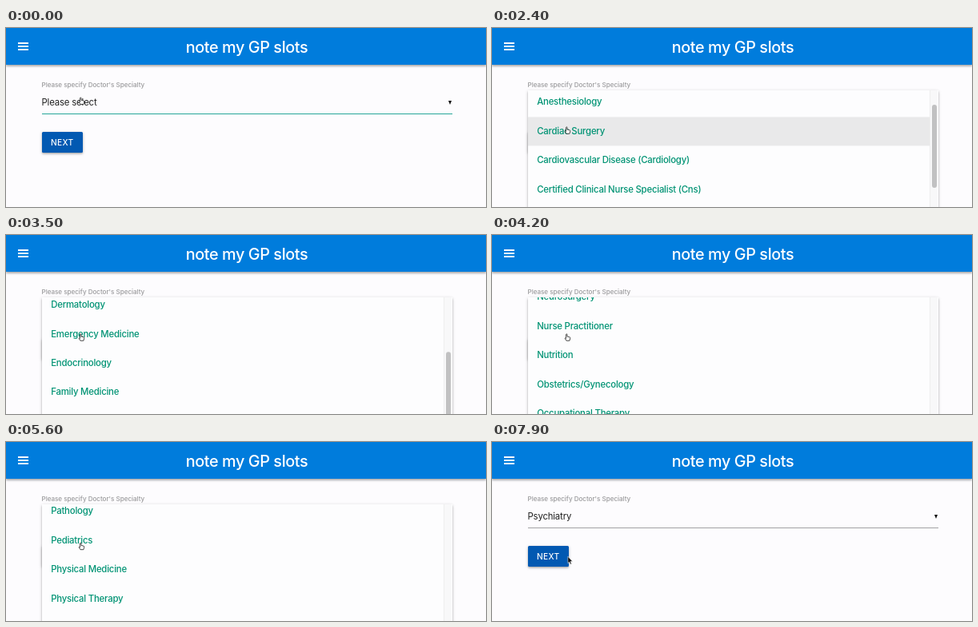
An HTML page for the animation above (8000 ms loop, 600 by 224 pixels).

```html
<!DOCTYPE html>
<html lang="en">
<head>
<meta charset="utf-8">
<title>Specialty picker</title>
<style>
  :root { --lift: 0 1.5px 2px rgba(0,0,0,.22), 0 1px 4px rgba(0,0,0,.18); }
  html, body { margin: 0; width: 100%; height: 100%; overflow: hidden; background: #fdfcfe; }
  body { position: relative; font: 11.4px Inter, "Liberation Sans", sans-serif; letter-spacing: -.016em; }
  body > *, .menu > *, .rows > * { position: absolute; white-space: nowrap; }
  header { left: 0; top: 0; width: 100%; height: 46.4px; background: #007cdc; box-shadow: var(--lift); }
  h1 { margin: 0; left: 1px; top: 0; width: 600px; text-align: center; color: #fff;
    font-size: 19.8px; font-weight: 450; line-height: 48px; letter-spacing: -.02em; }
  .burger { left: 15px; top: 18px; width: 13px; height: 1.8px; background: #fff;
    box-shadow: 0 4px #fff, 0 8px #fff; }
  .label { left: 44.5px; top: 65px; line-height: 12px; font-size: 8.1px; font-weight: 500; color: #9a9a9c;
    letter-spacing: -.004em; }
  .value { left: 44.5px; top: 83px; line-height: 20px; color: #212121; }
  .caret { left: 552.5px; top: 90.6px; border: solid transparent; border-width: 5.4px 2.9px 0;
    border-top-color: #111; }
  .line { left: 45px; top: 107px; width: 513px; height: 1px; }
  .next { left: 44.5px; top: 130px; width: 51.5px; height: 26px; border-radius: 1.5px; background: #0259b2;
    color: #fff; font-size: 10.2px; font-weight: 500; line-height: 26px; text-align: center;
    letter-spacing: .03em; box-shadow: var(--lift); }
  .menu { left: 44.5px; top: 77.5px; width: 513px; overflow: hidden; background: #fdfdfe;
    box-shadow: var(--lift); }
  .rows { left: 0; top: 0; width: 502.5px; }
  .rows div { left: 0; width: 491px; padding-left: 11.7px; height: 36.45px; line-height: 37px;
    color: #009374; font-weight: 500; letter-spacing: -.02em; }
  .track { left: 502.5px; top: 0; width: 10px; height: 473px; background: #f8f8f9; box-shadow: inset 1px 0 #eee; }
  .thumb { left: 505.3px; top: 1.8px; width: 6px; height: 103.5px; border-radius: 3px; background: #c1c1c2; }
  svg { left: 0; top: 0; overflow: visible; }
</style>
</head>
<body>
<header></header>
<h1>note my GP slots</h1>
<div class="burger"></div>
<div class="label">Please specify Doctor's Specialty</div>
<div class="value"></div>
<div class="caret"></div>
<div class="line"></div>
<div class="next">NEXT</div>
<div class="menu"><div class="rows"></div><div class="track"></div><div class="thumb"></div></div>
<svg class="cursor" width="12" height="14">
  <path class="hand" transform="scale(.9)" fill="#fff" stroke="#222" stroke-width=".9" stroke-linejoin="round"
    d="M-.8 .3Q0-.7 .8 .3V3.4L3.7 4Q4.8 4 4.8 5V6.6L4 9.2H-.3L-2.4 5.9Q-2.3 4.7-.8 6Z"/>
  <path class="arrow" fill="#111" stroke="#fff" stroke-width=".5" d="M0 0V8.6L1.9 6.9L3.2 9.8L4.6 9.2L3.3 6.3H5.9Z"/>
</svg>
<script>
const LOOP = 8000, STEP = 100, ROW = 36.45, MENU_TOP = 77.5, MENU_HEIGHT = 473, THUMB_RATIO = .2245;
const names = `Please select|Allergy/Immunology|Anesthesiology|Cardiac Surgery|Cardiovascular Disease (Cardiology)|
Certified Clinical Nurse Specialist (Cns)|Chiropractic|Dentistry|Dermatology|Emergency Medicine|Endocrinology|
Family Medicine|Gastroenterology|General Practice|General Surgery|Geriatric Medicine|Gynecology/Oncology|Hematology|
Infectious Disease|Internal Medicine|Nephrology|Neurology|Neurosurgery|Nurse Practitioner|Nutrition|
Obstetrics/Gynecology|Occupational Therapy|Ophthalmology|Optometry|Oral Surgery|Orthopedic Surgery|Otolaryngology|
Pain Management|Pathology|Pediatrics|Physical Medicine|Physical Therapy|Plastic Surgery|Podiatry|
Preventative Medicine|Psychiatry|Psychologist, Clinical|Pulmonary Disease|Radiology|Rheumatology|Sports Medicine|
Thoracic Surgery|Urology|Vascular Surgery`.split('|').map(s => s.trim());
const choice = names.indexOf('Psychiatry');

// Wheel flicks: start time, duration, row that ends up on top.
const flicks = [[1600, 1000, 2.16], [2900, 200, 5.9], [3400, 200, 9], [3700, 800, 24.7],
  [4700, 400, 25.2], [5200, 200, 30], [5500, 500, choice - 1]];

const ramp = (t, start, length) => Math.min(1, Math.max(0, (t - start) / length));
const easeOut = p => 1 - (1 - p) ** 2;
const scrollAt = t => ROW * flicks.reduce(
  (row, [start, length, to]) => row + (to - row) * easeOut(ramp(t, start, length)), 0);

const $ = s => document.querySelector(s);
const [menu, rowBox, thumb, value, line, cursor, hand, arrow] =
  ['.menu', '.rows', '.thumb', '.value', '.line', '.cursor', '.hand', '.arrow'].map($);
const rows = names.map((name, i) => {
  const row = document.createElement('div');
  row.textContent = name;
  row.style.top = i * ROW + 'px';
  return rowBox.appendChild(row);
});

function draw(now) {
  const t = Math.floor(now % LOOP / STEP) * STEP;
  const top = scrollAt(t);
  const opened = easeOut(ramp(t, 100, 300)), closed = ramp(t, 7300, 300);
  const leave = ramp(t, 7500, 400);
  const x = 93.3 + 1.5 * leave;
  const y = 87.2 + 36.8 * ramp(t, 1300, 300) + 2.4 * ramp(t, 4700, 900) + 16.8 * leave;
  const scrolling = t >= 2900 && t < 6800;
  const hot = scrolling ? -1 : Math.floor((y - MENU_TOP + top) / ROW);
  const picked = t >= 7000, pointing = leave < .5;

  menu.style.opacity = opened * (1 - closed);
  menu.style.height = MENU_HEIGHT * opened + 'px';
  rowBox.style.transform = `translateY(${-top}px)`;
  thumb.style.transform = `translateY(${top * THUMB_RATIO}px)`;
  rows.forEach((row, i) => row.style.background = i !== hot ? 'none' : i ? '#e9e9ea' : '#f3f3f5');

  value.textContent = names[picked ? choice : 0];
  line.style.background = picked ? '#a2a2a4' : '#26a69a';
  cursor.style.transform = `translate(${x}px, ${y}px)`;
  hand.style.display = pointing ? '' : 'none';
  arrow.style.display = pointing ? 'none' : '';
}

const start = performance.now();
function tick() {
  draw(performance.now() - start);
  requestAnimationFrame(tick);
}
tick();
</script>
</body>
</html>
```
